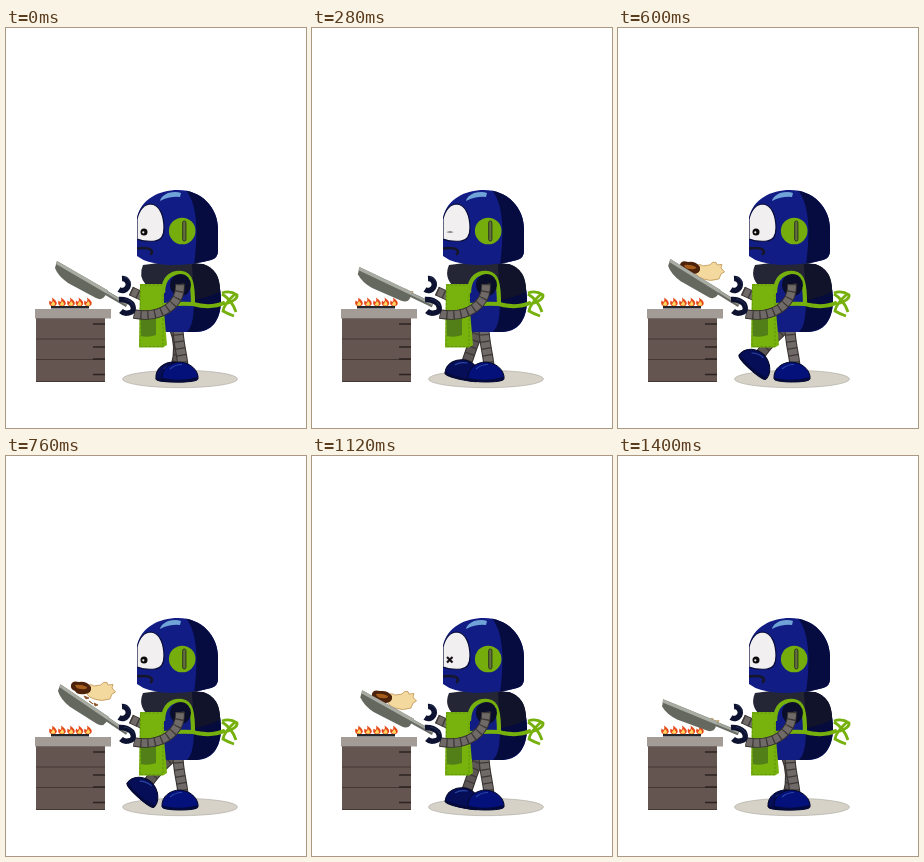
Write an HTML page that moves like this. It is 300 px wide and 400 px high and loops after 1440 ms.

```html
<!DOCTYPE html>
<html lang="en">
<head>
<meta charset="utf-8">
<title>Cooking robot</title>
<style>
  html, body { margin: 0; width: 100%; height: 100%; overflow: hidden; background: #fff; }
  svg { display: block; width: 300px; height: 400px; }
  .tube { fill: none; }
  .tube .edge { stroke: #35302e; stroke-width: 11; }
  .tube .metal { stroke: #6f6a67; stroke-width: 9; }
  .tube .rings { stroke: #3d3836; stroke-width: 10; stroke-dasharray: 1.3 5.7; }
  #farLeg .metal { stroke: #5c5754; }
  .arm .edge { stroke-width: 9.6; }
  .arm .metal { stroke-width: 7.8; }
  .arm .rings { stroke-width: 9; }
  .green { fill: none; stroke: #76b00d; }
</style>
</head>
<body>
<svg viewBox="0 0 300 400">
  <defs>
    <clipPath id="above"><path id="rim" d="M0 203L51 233.5L102 263.5L150 292V120H0Z"/></clipPath>
    <clipPath id="headClip"><path d="M131 190C135 171 153 162 172 162C196 162 212 180 212 201V223Q212 230 205 232Q188 237 163 237Q141 236 131 228Z"/></clipPath>
    <g id="foot">
      <path d="M-18 7C-19-4-9-10 0-10C12-9 19 0 18 7C17 11-16 11-18 7Z" fill="currentColor" stroke="#030727"/>
      <path d="M-17 6Q0 10 17.500 5Q18 9 14 9Q0 11-15 9Q-18 8-17 6Z" fill="#050a3c"/>
      <path d="M-10-3Q-5-7.500 2-7.500" fill="none" stroke="#2a45a4" stroke-width="1.1"/>
    </g>
    <g id="flame">
      <path d="M-1 0Q5 4 3.500 7Q2 9.500-.5 9Q-5 8-3.500 3Q-2 4-1.500 4.500Q0 2-1 0Z" fill="#e6481a"/>
      <path d="M0 3.500Q3 6 1.500 8Q-1 9-2.300 7Q-1 6 0 3.500Z" fill="#ffd765"/>
    </g>
  </defs>

  <ellipse cx="174" cy="351" rx="57.5" ry="8.7" fill="#d6d2c7" stroke="#aaa79f" stroke-width=".6"/>

  <!-- stove -->
  <path d="M30 289H99V354H30Z" fill="#645550"/>
  <path d="M30 290.5H99M30 311H99M30 331.5H99M30 353.5H99" stroke="#443834" stroke-width="1.1"/>
  <path d="M87 296H99M87 319H99M87 331H99M87 346.5H99" stroke="#2b2321" stroke-width="1.7"/>
  <path d="M29 281H105V290.5H29Z" fill="#a39b95"/>
  <g id="flames"></g>
  <path d="M45 278H83V280.5H45Z" fill="#24242a"/>

  <!-- legs, far arm -->
  <g class="tube" id="farLeg"><path class="edge"/><path class="metal"/><path class="rings"/></g>
  <use href="#foot" id="farFoot" color="#060e58"/>
  <g class="tube" data-d="M172 299C172 315 176 325 177 338"></g>
  <use href="#foot" x="174" y="344" color="#04117a"/>
  <g class="tube arm" data-d="M125 263L138 269"></g>

  <!-- body -->
  <path d="M147 250C150 238 165 235 180 235C205 235 215 250 215 272C215 293 205 304 190 304H160C150 296 147 280 147 250Z" fill="#111d82"/>
  <path d="M186 235C207 236 215 250 215 272C215 293 205 304 188 304H181C188 297 189 282 187 250Z" fill="#060b3e"/>
  <path d="M137 237Q165 232 197 236C211 241 214 251 214 264H188C189 251 181 244 170 244Q158 246 156 257H140Q132 248 137 237Z" fill="#242636"/>
  <path d="M186 236H197C211 241 214 251 214 264Q201 270 188 272Z" fill="#10132a"/>

  <!-- apron -->
  <path d="M134 256H158V283L161 317L157 319.5H133Z" fill="#78b20d"/>
  <path d="M134.500 257H157V318.500H134Z" fill="none" stroke="#5b920b" stroke-width=".8" stroke-dasharray="2.500 1.500"/>
  <path d="M134.500 289H150V307Q142 310 135 308Z" fill="#527f18"/>
  <path class="green" stroke-width="4.2" d="M157 265C157 249 166 244 176 245C185 246 187 256 187 277"/>
  <path class="green" stroke-width="4" d="M158 277Q174 275 187 276Q205 281 219 274.500"/>
  <path class="green" stroke-width="2.8" d="M216 265Q224 262 231 267Q232 272 219 276M216 266Q226 272 230 284M229 266Q218 276 217 283Q222 286 228 288"/>

  <!-- pan and food -->
  <g clip-path="url(#above)">
    <g id="food">
      <path d="M79 231Q84 227 88 230L95 229Q97 225 101 226.500L102 229L107 228.500L106 232L109.500 236L106 238L104 243Q95 246 88 243Q79 240 79 231Z" fill="#f3d99d" stroke="#c79c60" stroke-width=".9"/>
      <path d="M65 229Q66 224 73 226Q81 225 85 231Q86 237 79 238Q71 239 69 235Q64 233 65 229Z" fill="#4d240b"/>
      <path d="M69 229Q75 228 81 231Q81 234 75 233Q70 233 69 229Z" fill="#a55d1c"/>
      <path d="M78 240L83 242L80 243ZM88 247L92 249L89 250ZM83 245L87 248Z" fill="#885022" stroke="#885022" stroke-width=".8"/>
    </g>
  </g>
  <g id="pan">
    <path d="M97 263L121 277" stroke="#686b64" stroke-width="4.6"/>
    <path d="M97 262L121 276" stroke="#a4a79e" stroke-width="2.4"/>
    <path d="M51 233L102 262.500L99 268Q96 273 90 270L62 255Q52 248 49 240Z" fill="#65685f"/>
    <path d="M51 233L102 262.500L100.500 265.500L50 236Z" fill="#a9aca2"/>
  </g>

  <!-- near arm and hands -->
  <ellipse cx="174.500" cy="257" rx="10.5" ry="11" fill="#0a0e2b"/>
  <g class="tube arm" data-d="M174 256C175 276 156 291 128 286"></g>
  <g fill="none" stroke="#0c122f" stroke-width="5.4">
    <path d="M116 250.500A6 6 0 1 1 113 261.500"/>
    <path d="M113 271.500Q121 271 126 276Q130 284 122 285Q118 286 115 283"/>
  </g>
  <path d="M118 249Q124 251 124.500 256M118 271Q125 272 128 278" fill="none" stroke="#28345e" stroke-width=".8"/>

  <!-- head -->
  <g clip-path="url(#headClip)">
    <path d="M125 155H216V240H125Z" fill="#111d85"/>
    <path d="M176 158C191 171 193 199 188 237H216V155Z" fill="#060b40"/>
    <path d="M131 211V191Q135 176 145 176C154 177 158 188 158 200Q158 212 149 213Q139 214 131 211Z" fill="#f2eff1" stroke="#080d3a" stroke-width="1.2"/>
    <path d="M131 220.500Q143 219 145.500 222.500Q147 225 144 226.500" fill="none" stroke="#15162a" stroke-width="2.6"/>
  </g>
  <path d="M154 173Q155 168 162 165Q170 163 175 165L174 169Q164 168 154 173Z" fill="#70a4d8"/>
  <circle cx="176.2" cy="203" r="13.3" fill="#75ad0c"/>
  <rect x="176.7" y="193" width="3.2" height="20" rx="1.6" fill="#65703f" stroke="#2c3420"/>

  <g id="pupil">
    <circle r="3.5" fill="#0c0a0b"/>
    <circle cx="-.7" cy=".3" r="1.1" fill="#eee"/>
  </g>
  <path id="cross" d="M135 201L140.500 206.500M140.500 201L135 206.500" stroke="#161216" stroke-width="2.2"/>
</svg>
<script>
  const LOOP = 1440;
  const $ = id => document.getElementById(id);

  const times = [0, 160, 280, 600, 760, 920, 1120, 1400];
  const tracks = {
    panTilt: [0, -7, -4.8, 1.6, 4, 3.5, -.9, -8],
    foodX: [-6, -6, -6, -3, 0, -.7, -5, -6],
    foodY: [36, 36, 35, 8, 0, -.5, 9, 36],
    footX: [168, 159, 152, 139, 139, 145.5, 152, 168],
    footY: [344, 344, 342, 334, 334, 339, 342, 344],
    footTilt: [0, 4, 12, 42, 42, 32, 12, 0]
  };

  // Cubic interpolation through the keyed poses.
  function sample(values, t) {
    const last = times.length - 1;
    let i = 0;
    while (i < last - 1 && t >= times[i + 1]) i++;
    const slope = k => {
      const a = Math.max(k - 1, 0), b = Math.min(k + 1, last);
      return (values[b] - values[a]) / (times[b] - times[a]);
    };
    const span = times[i + 1] - times[i];
    const u = Math.min((t - times[i]) / span, 1), v = 1 - u;
    return v * v * (1 + 2 * u) * values[i] + u * u * (3 - 2 * u) * values[i + 1]
      + span * u * v * (v * slope(i) - u * slope(i + 1));
  }

  function setTube(group, d) {
    for (const path of group.children) path.setAttribute('d', d);
  }

  for (const group of document.querySelectorAll('[data-d]')) {
    group.innerHTML = $('farLeg').innerHTML;
    setTube(group, group.dataset.d);
  }
  $('flames').innerHTML = [47, 56, 65, 73.5, 82]
    .map(x => `<use href="#flame" x="${x}" y="269.500"/>`).join('');

  function draw(t) {
    const pose = {};
    for (const name in tracks) pose[name] = sample(tracks[name], t);
    const { panTilt, foodX, foodY, footX, footY, footTilt } = pose;

    const tilt = `rotate(${panTilt} 122 280)`;
    $('pan').setAttribute('transform', tilt);
    $('rim').setAttribute('transform', tilt);
    $('food').setAttribute('transform', `translate(${foodX} ${foodY})`);

    $('farFoot').setAttribute('transform', `translate(${footX} ${footY}) rotate(${footTilt})`);
    setTube($('farLeg'), `M168 299Q${footX + 8} 318 ${footX + 2} ${footY - 5}`);

    const crossed = t >= 880 && t < 1280;
    const open = Math.max(.12, Math.min(1, Math.abs(t - 280) / 80));
    $('pupil').setAttribute('transform', `translate(138 204) scale(1 ${open})`);
    $('pupil').style.display = crossed ? 'none' : '';
    $('cross').style.display = crossed ? '' : 'none';
  }

  const start = performance.now();
  function tick() {
    draw((performance.now() - start) % LOOP);
    requestAnimationFrame(tick);
  }
  draw(0);
  requestAnimationFrame(tick);
</script>
</body>
</html>
```
